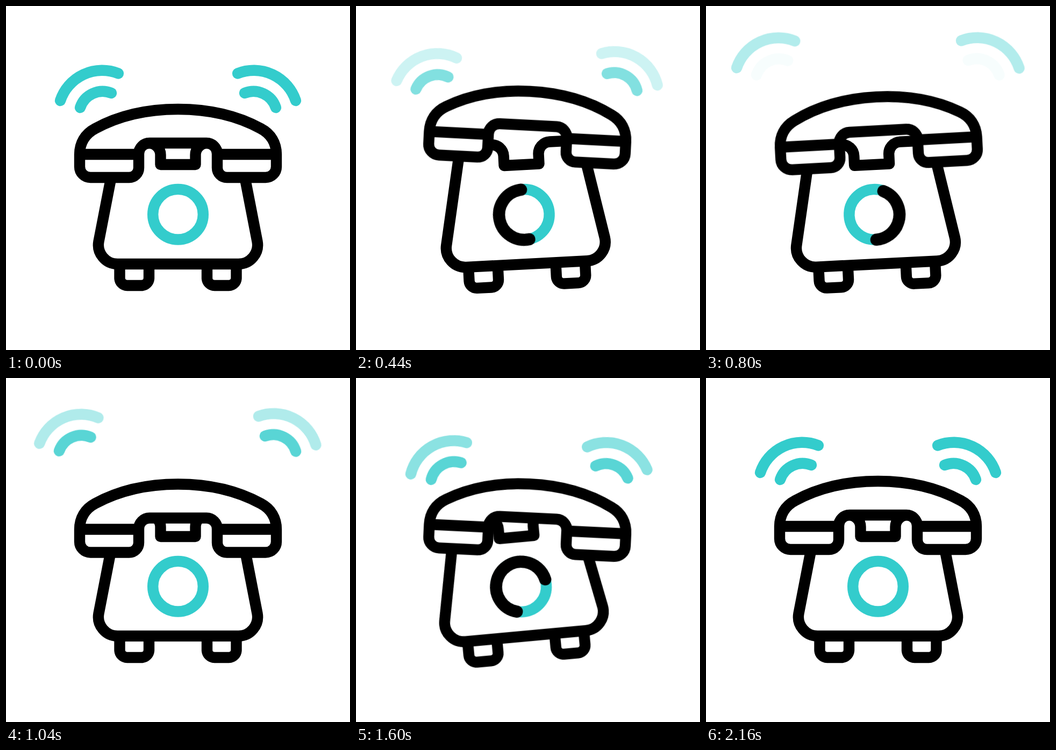
Write an HTML page without scripts that moves like this. It is 640x640 px and loops after 2.2 s.

```html
<!DOCTYPE html>
<html lang="en">
<head>
<meta charset="utf-8">
<title>Ringing telephone</title>
<style>
html, body { margin: 0; width: 100%; height: 100%; overflow: hidden; background: #fff; }
svg { display: block; width: 100vw; height: 100vh; }

.ink { fill: #fff; stroke: #000; stroke-width: 20.4; stroke-linejoin: round; }
.teal { fill: none; stroke: #33cccc; stroke-width: 20.4; stroke-linecap: round; }
.trace {
  fill: none; stroke: #000; stroke-width: 22.6; stroke-linecap: round;
  transform-origin: 320px 388px;
  animation: trace 2.2s linear infinite;
}

.body, .handset, .wave, .outer, .inner {
  animation: 2.2s cubic-bezier(.37, 0, .63, 1) infinite;
}
.body { transform-origin: 320px 527px; animation-name: sway; }
.handset { transform-origin: 320px 260px; animation-name: rattle, hop; }
.wave { animation-name: spread, wobble; }
.left { --x: -44px; transform-origin: 155px 152px; }
.right { --x: 44px; transform-origin: 485px 152px; }
.outer { animation-name: blink-outer; }
.inner { animation-name: blink-inner; }

@keyframes sway {
  0%, 45.45%, 49.09%, 94.55%, 100% { rotate: 0deg; }
  8.64%, 22.27%, 39.32%, 57.73%, 71.36%, 88.41% { rotate: -6deg; }
  15.68%, 30.91%, 64.77%, 80% { rotate: 6deg; }
}
@keyframes rattle {
  0%, 46.82%, 49.09%, 95.91%, 100% { rotate: 0deg; }
  4.09%, 16.82%, 27.27%, 38.41%, 53.18%, 65.91%, 76.36%, 87.5% { rotate: -6.6deg; }
  9.32%, 21.73%, 32.73%, 58.41%, 70.82%, 81.82% { rotate: 6.3deg; }
  43.64%, 92.73% { rotate: 3deg; }
}
@keyframes hop {
  0%, 83.64%, 97.3%, 100% { translate: 0 0; }
  26.8% { translate: 0 -39px; }
  50.91% { translate: 0 8px; }
  63.64% { translate: 0 9px; }
  90% { translate: 0 -20px; }
}
@keyframes spread {
  0%, 76.36%, 100% { translate: 0 0; }
  38.18% { translate: var(--x) -61px; }
}
@keyframes wobble {
  0%, 76.36%, 100% { rotate: 0deg; }
  4.5%, 27.7%, 72.7% { rotate: -4.2deg; }
  14.5%, 39.5%, 50.5% { rotate: -5deg; }
  8.64%, 21.1%, 33.6%, 67.7% { rotate: 5deg; }
  44.8%, 56.1% { rotate: 6deg; }
  61.8% { rotate: -6.3deg; }
}
@keyframes blink-inner {
  0%, 25.45%, 50.91%, 76.36%, 100% { opacity: 1; }
  12.73%, 38.18%, 63.64% { opacity: 0; }
}
@keyframes blink-outer {
  0%, 2.7%, 29.1%, 54.6%, 77.3%, 100% { opacity: 1; }
  15.5%, 41.8%, 67.3% { opacity: 0; }
}
@keyframes trace {
  0%, 3.6%, 52.7% { rotate: 0deg; stroke-dasharray: 0 360; opacity: 0; }
  3.61%, 52.71% { rotate: 0deg; stroke-dasharray: 0 360; opacity: 1; }
  10.91% { rotate: 19.5deg; stroke-dasharray: 64 360; }
  61.82% { rotate: 29.5deg; stroke-dasharray: 129 360; }
  27.27%, 76.36% { rotate: 130deg; stroke-dasharray: 280 360; }
  38.18%, 83.64% { rotate: 325.5deg; stroke-dasharray: 130 360; }
  45.9%, 95% { rotate: 460deg; stroke-dasharray: 0 360; opacity: 1; }
  45.91%, 95.01% { rotate: 460deg; stroke-dasharray: 0 360; opacity: 0; }
  52.69%, 100% { rotate: 0deg; stroke-dasharray: 0 360; opacity: 0; }
}
</style>
</head>
<body>
<svg viewBox="0 0 640 640">
  <g class="wave left">
    <path class="teal outer" d="M101 176A82 82 0 0 1 209 125.500"/>
    <path class="teal inner" d="M138 189A44 44 0 0 1 196 162"/>
  </g>
  <g class="wave right">
    <path class="teal outer" d="M539 176A82 82 0 0 0 431 125.500"/>
    <path class="teal inner" d="M502 189A44 44 0 0 0 444 162"/>
  </g>

  <g class="body">
    <path class="ink" d="M211.500 478V506a14 14 0 0 0 14 14H252a14 14 0 0 0 14-14V478"/>
    <path class="ink" d="M374 478V506a14 14 0 0 0 14 14H414.500a14 14 0 0 0 14-14V478"/>
    <path class="ink" d="M208 255H265.500a22 22 0 0 1 22 22V295H352.500V277a22 22 0 0 1 22-22H432
      L467.500 438c4 22-13 42-35 42H207.500c-22 0-39-20-35-42Z"/>
    <circle class="teal" cx="320" cy="387.700" r="46.800"/>
    <circle class="trace" cx="320" cy="388" r="46.800" pathLength="360"/>
  </g>

  <g class="handset">
    <path class="ink" d="M137 276C137 255 147 238 166 228C210 204 262 192 320 192
      C378 192 430 204 474 228C493 238 503 255 503 276V299a20 20 0 0 1-20 20H411
      a18 18 0 0 1-18-18V275a20 20 0 0 0-20-20H267a20 20 0 0 0-20 20V301
      a18 18 0 0 1-18 18H157a20 20 0 0 1-20-20Z"/>
    <path class="ink" d="M137 276H247M393 276H503"/>
  </g>
</svg>
</body>
</html>
```
